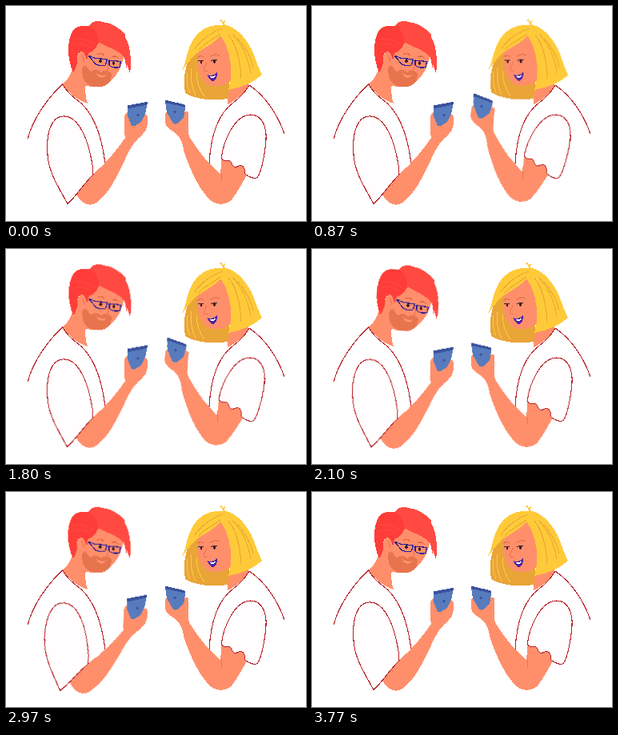
Write an HTML page that moves like this. It is 375 by 269 pixels and loops after 4.16 s.

```html
<!DOCTYPE html>
<html lang="en">
<head>
<meta charset="utf-8">
<title>Two people with phones</title>
<style>
html, body { margin: 0; width: 100%; height: 100%; overflow: hidden; background: #fff; }
svg { display: block; width: 100vw; height: 100vh; shape-rendering: crispEdges; }
.skin { fill: #ff8f6b; }
.cloth { fill: #fffdfd; stroke: #b8222a; stroke-width: 1.1; stroke-linejoin: round; }
.seam, .strand, .ink { fill: none; stroke-linecap: round; stroke-linejoin: round; }
.seam { stroke: #b8222a; stroke-width: 1.1; }
.strand { stroke: #e8a730; stroke-width: 1; }
.crease { fill: none; stroke: #e8704c; stroke-width: 1; stroke-linecap: round; }
.case { fill: #577bbd; }
.edge { fill: #3a529d; }
.ink { stroke: #2b1c94; stroke-width: 1.2; }

g { animation: 4160ms ease-in-out infinite; }
.her-head { transform-origin: 282px 108px; animation-name: her-head; }
.her-arm { transform-origin: 305px 135px; animation-name: her-arm; }
.her-hand { transform-origin: 212px 140px; animation-name: her-hand; }
.his-head { transform-origin: 94px 100px; animation-name: his-head; }
.his-arm { transform-origin: 62px 145px; animation-name: his-arm; }
.his-hand { transform-origin: 160px 148px; animation-name: his-hand; }

@keyframes her-head {
  0%, .7%, 39.4%, 100% { transform: rotate(0deg); }
  13.6% { transform: rotate(4.6deg); }
  26.8% { transform: rotate(-1.6deg); }
  36% { transform: rotate(-1deg); }
}
@keyframes her-arm {
  0%, .7%, 52.2%, 100% { transform: rotate(0deg); }
  13.6% { transform: rotate(1.5deg); animation-timing-function: cubic-bezier(.2, .6, .4, 1); }
  26.8% { transform: rotate(4.5deg); }
  39.7% { transform: rotate(4.2deg); }
}
@keyframes her-hand {
  0%, .7%, 52.2%, 100% { transform: rotate(0deg); }
  13.6% { transform: rotate(1.2deg); animation-timing-function: cubic-bezier(.2, .6, .4, 1); }
  26.8%, 39.7% { transform: rotate(4deg); }
}
@keyframes his-head {
  0%, 39.7%, 78.6%, 100% { transform: rotate(0deg); }
  52.5% { transform: rotate(4deg); }
  65.7% { transform: rotate(-1deg); }
}
@keyframes his-arm {
  0%, 39.7%, 90.6%, 100% { transform: rotate(0deg); }
  52.5% { transform: rotate(1.7deg); animation-timing-function: cubic-bezier(.2, .6, .4, 1); }
  65.7%, 79% { transform: rotate(5.2deg); }
}
@keyframes his-hand {
  0%, 39.7%, 90.6%, 100% { transform: rotate(0deg); }
  52.5% { transform: rotate(-1.8deg); animation-timing-function: cubic-bezier(.2, .6, .4, 1); }
  65.7%, 79% { transform: rotate(-5.6deg); }
}
</style>
</head>
<body>
<svg viewBox="0 0 375 269" preserveAspectRatio="none">
  <!-- man: body -->
  <path class="skin" d="M83 78C81 87 77 92 71 98C78 109 89 118 102 122C100 116 99 110 99 101L108 92Z"/>
  <path class="seam" d="M27.500 165C33 143 51 116 70.500 98C75 105 80 111 87 116C106 129 119 157 124 197"/>

  <!-- man: head -->
  <g class="his-head">
    <path class="skin" d="M84 80L93 52L116 40L150 52L147 64C145 75 139 87 131 94C124 101 110 104 99 99L84 90Z"/>
    <path fill="#e8744d" d="M98 72C102 77 104 82 107 82C112 78 116 80 119 83C123 79 129 81 132 84L131 94C124 102 112 104 103 98C96 94 95 85 95 79Z"/>
    <path fill="#ff4a42" d="M82 60L92 27L104 25C108 18 115 18 121 20C131 21 142 27 149 36L149 39C154 47 158 65 155 85L151.500 74L151 79L148 64C142 56 130 53 117 46L104 58Z"/>
    <path fill="#ff3d38" d="M84 83C76 66 76 42 84 30C89 24 97 25 104 25C112 28 116 37 115 47C112 54 107 58 103 59L101 68C99 62 98 57 94 56C89 58 88 66 89 72C87 77 87 80 84 83Z"/>
    <path d="M82 50C90 45 97 47 106 52M85 42C94 39 103 43 111 48" fill="none" stroke="#ff4a42"/>
    <path class="skin" d="M101 70C99 59 95 54 92 58C89 63 92 75 99 76Z"/>
    <path class="crease" d="M94 61C96 62 97 66 98 70"/>
    <path d="M114 61C117 58 120 59 123 62M132 64C135 62 139 63 141 66" fill="none" stroke="#e0623f" stroke-width="1.2"/>
    <ellipse cx="118" cy="69" rx="1.800" ry="2.300" fill="#3b1b25"/>
    <ellipse cx="134.500" cy="71.500" rx="1.700" ry="2.200" fill="#3b1b25"/>
    <path class="crease" d="M126 71C128 76 129 79 125 81"/>
    <path d="M113 84C116 87 121 88 125 86C122 91 116 91 113 84Z" fill="#ff9a76"/>
    <path class="ink" d="M103 62L111.500 65.500L126 66.500L124.500 74.500C119 75.500 113 74 111.500 72ZM129 68L143.500 69.500L142 76.500C136 78 130 76 129 74ZM126 68.500L129 69"/>
  </g>

  <!-- man: arm -->
  <g class="his-arm">
    <path class="skin" d="M82 226L109 210C124 198 138 181 149 165C147 156 148 146 148 138L160 134L176 136C179 142 177 150 174 156C171 162 160 168 154 181C145 199 134 228 117 243C108 252 98 250 90 239Z"/>
    <path class="crease" d="M97 218L101 225"/>
    <g class="his-hand">
      <path class="case" d="M152 126L177 121L174 135C171 142 169 146 165 147.500C162 150 159 150.500 157 150L152.500 139Z"/>
      <path class="edge" d="M151.500 125Q152 124 154 124L177 119.800L176.500 123.500L152.500 128.500Z"/>
      <circle class="edge" cx="165" cy="136.500" r="1.700"/>
      <path class="skin" d="M148 143C148 137 149 133 152 133L152.500 139L157 150L157 155L149 154Z"/>
      <path class="skin" d="M165 150C170 146 171 141 175 136C179 142 177 150 174 157Z"/>
    </g>
    <path class="cloth" d="M77 247.500C67 229 53 208 52 186C50 157 57 139 71 138C88 136 100 161 105 184C108 196 109 205 109 211C98 221 88 238 77 247.500Z"/>
  </g>

  <!-- woman: body -->
  <path class="skin" d="M279 98L300 91L304 100C297 110 288 118 277 123L278 110Z"/>
  <path class="seam" d="M348 160C340 137 325 113 304 99C299 108 292 115 284 121C265 135 256 161 254 197"/>

  <!-- woman: head -->
  <g class="her-head">
    <path fill="#e9a537" d="M230 60C223 78 221 97 224 109C237 117 258 119 278 116L280 84L245 55Z"/>
    <path class="skin" d="M239 58C238 75 241 88 248 95C254 102 270 102 281 94L283 67L270 34Z"/>
    <path fill="#ffca39" d="M271 24C255 22 241 30 234 42C228 52 226 62 224 70C222 77 220 81 217 84C224 76 231 65 240 58C252 50 262 45 268 37C277 48 282 68 281 85C281 93 280 99 278 105C294 102 309 96 320 86C316 78 313 70 309 59C303 44 290 27 273 23L274 17L271 20L269 16.500L267 18.500L270 20Z"/>
    <path class="strand" d="M271 28C261 31 246 39 236 54M268 35C257 43 247 47 240 56M278 36C288 48 293 70 294 91M283 35C295 48 303 65 306 84M289 40C300 52 306 64 309 77"/>
    <path d="M227 83C225 93 227 102 230 109M232 78C229 91 233 103 237 112M238 82C238 94 242 105 248 113" fill="none" stroke="#ffca39"/>
    <path d="M239 65C241 62 244 62 247 64M255 64C259 60 263 60 267 62" fill="none" stroke="#dc6a42"/>
    <path d="M240 69Q243 67.500 247 69M256 69Q260 66.500 264 68" fill="none" stroke="#3b1b25"/>
    <ellipse cx="244" cy="70" rx="1.600" ry="2" fill="#3b1b25"/>
    <ellipse cx="260.500" cy="69.500" rx="1.700" ry="2.100" fill="#3b1b25"/>
    <path class="crease" d="M251 70C250 75 246 78 248 81C249 82 251 82 252 81"/>
    <path fill="#4b24a5" d="M252 86C256 88 260 87 264 83C264 89 262 94 258 94C255 93 253 90 252 86Z"/>
    <path fill="#fff" d="M254 88C257 89 260 88 262.500 86C261 91 257 92 254 88Z"/>
  </g>

  <!-- woman: arm -->
  <g class="her-arm">
    <path class="skin" d="M198.500 137L226 132L228 150C227 157 228 161 230 165C238 178 248 191 258 201L268 210L270 188L301 190L302 209C296 221 289 233 283 241C276 250 262 250 253 241C238 225 229 200 223 184C221 172 218 164 212 159C205 154 200 150 199 146Z"/>
    <path class="crease" d="M268 209C270 212 270 216 269 219"/>
    <g class="her-hand">
      <path class="case" d="M199 119L224 125L223 138L217 145C214 148 211 148 209 147L201 133Z"/>
      <path class="edge" d="M198.500 117.500L222 123Q224 123.500 224 126.500L199 121Z"/>
      <circle class="edge" cx="211" cy="132.500" r="1.700"/>
      <path class="skin" d="M213 153L217 146C221 143 222 139 223 136C224 132 227 131 228 134L228 151Z"/>
      <path class="skin" d="M199 134L201 133C203 140 206 144 210 148L211 158C204 154 199 151 199 145Z"/>
    </g>
    <path class="cloth" d="M269 191C272 168 286 136 306 136C321 136 326 153 325 168C323 190 318 215 312 215.500C306 215 302 213 299 210C298 206 299 202 295 200C291 198 289 203 285 201C281 199 283 194 279 193.500C275 193 272 195 269 191Z"/>
  </g>
</svg>
</body>
</html>
```
